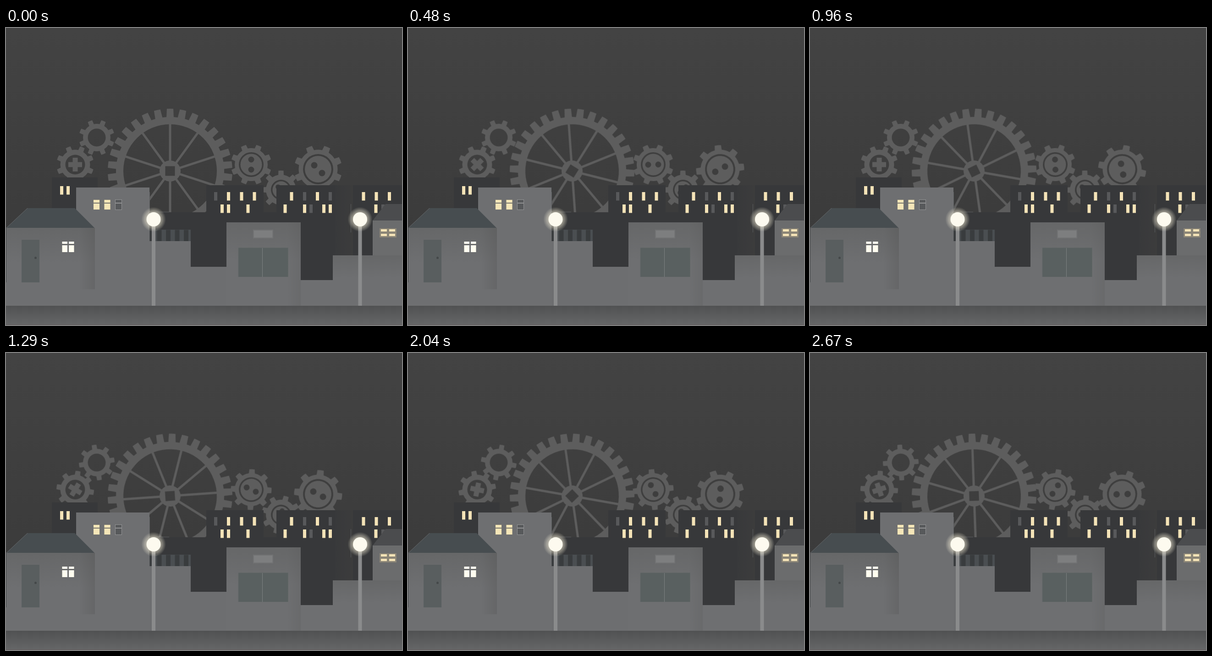
An HTML page that plays this animation: 864 px wide and 648 px high, repeating every 2700 ms.

```html
<!DOCTYPE html>
<html lang="en">
<head>
<meta charset="utf-8">
<title>Clockwork town at night</title>
<style>
  html, body { margin: 0; width: 100%; height: 100%; overflow: hidden; background: #404040; }
  svg { display: block; width: 100vw; height: 100vh; }
  .spin { animation: spin 2.7s steps(90, end) infinite; }
  @keyframes spin {
    from { transform: rotate(0deg); }
    to { transform: rotate(var(--turn)); }
  }
</style>
</head>
<body>
<svg viewBox="0 0 864 648" preserveAspectRatio="none">
  <defs>
    <linearGradient id="sky" x2="0" y2="1">
      <stop offset="0" stop-color="#434343"/>
      <stop offset=".35" stop-color="#3f3f3f"/>
      <stop offset=".7" stop-color="#3b3b3b"/>
    </linearGradient>
    <linearGradient id="road" x2="0" y2="1">
      <stop offset="0" stop-color="#505152"/>
      <stop offset="1" stop-color="#656667"/>
    </linearGradient>
    <linearGradient id="wall" x2="0" y2="1">
      <stop offset="0" stop-color="#666768"/>
      <stop offset=".45" stop-color="#6e6f71"/>
    </linearGradient>
    <linearGradient id="shade">
      <stop offset="0" stop-color="#555" stop-opacity="0"/>
      <stop offset="1" stop-color="#555" stop-opacity=".35"/>
    </linearGradient>
    <linearGradient id="haze">
      <stop offset="0" stop-color="#38393b"/>
      <stop offset="1" stop-color="#3c3c3c"/>
    </linearGradient>
    <radialGradient id="glow">
      <stop offset=".5" stop-color="#fff8e0" stop-opacity=".6"/>
      <stop offset="1" stop-color="#fff8e0" stop-opacity="0"/>
    </radialGradient>
  </defs>

  <rect width="864" height="648" fill="url(#sky)"/>
  <g id="gears" fill="#5d5d5d" fill-rule="evenodd" stroke="none"></g>

  <!-- far blocks -->
  <g fill="#37383a">
    <path d="M100 326H200V400H100Z"/>
    <path d="M313 402H437V343H562V402H590V343H717V606H313Z"/>
    <path d="M757 343H864V500H757Z"/>
    <path d="M717 343H757V500H717Z" fill="url(#haze)"/>
  </g>
  <path d="M313.500 358V401.500H356M752.500 384V446" fill="none" stroke="#595b5d"/>
  <g id="lights"></g>

  <!-- near walls -->
  <path d="M153 348H313V606H153Z" fill="#6e6f71"/>
  <path d="M313 440H403V466H313Z" fill="#4a4e51"/>
  <path d="M314 453H403" stroke="#393c3e" stroke-width="25" stroke-dasharray="10 9.500" stroke-dashoffset="4"/>
  <path d="M313 465H403V521H481V606H313Z" fill="#6d6e70"/>
  <path d="M481 424H643V606H481Z" fill="url(#wall)"/>
  <path d="M613 424H643V606H613Z" fill="url(#shade)" opacity=".6"/>
  <path d="M643 550H713V496H864V606H643Z" fill="url(#wall)"/>
  <path d="M540 441H582V458H540Z" fill="#7d7e7f" stroke="#727374" stroke-width="2"/>
  <path d="M507 479H615V543H507Z" fill="#596060"/>
  <path d="M559.500 479V543" stroke="#7c8181"/>
  <path d="M507 543V479.500H615.500V543" fill="none" stroke="#626767"/>

  <g id="panes" fill="#f8e9ba"></g>

  <!-- left house -->
  <path d="M0 436H194V606H0Z" fill="url(#wall)"/>
  <path d="M160 436H194V570H160Z" fill="url(#shade)"/>
  <path d="M.5 436V555" stroke="#444648"/>
  <path d="M1 436L47 393H150L193 436Z" fill="#474d50"/>
  <path d="M1 436L47 393" stroke="#66696b"/>
  <path d="M34 462H73V555H34Z" fill="#595e5f"/>
  <circle cx="64.500" cy="501.500" r="2.500" fill="#444849"/>
  <path d="M122.500 466H134V471H122.500ZM137 466H148.500V471H137ZM122.500 474H134V489H122.500ZM137 474H148.500V489H137Z" fill="#fffdf0"/>

  <!-- right house -->
  <path d="M800 420H864V496H800Z" fill="#6b6c6d"/>
  <path d="M800 420L828 384H864V420Z" fill="#4b4c4e"/>
  <path d="M815 437H852V457H815Z" fill="#8b8577"/>
  <path d="M818 439H831V444H818ZM836 439H849V444H836ZM818 449H831V454H818ZM836 449H849V454H836Z" fill="#f4e3b7"/>

  <path d="M0 606H864V648H0Z" fill="url(#road)"/>
  <path d="M0 606.500H864" stroke="#515253"/>
  <path d="M0 647.500H864" stroke="#625b5c"/>
  <g id="lamps"></g>
</svg>

<script>
const $ = id => document.getElementById(id);
const rect = (x, y, w, h, fill) => `<rect x="${x}" y="${y}" width="${w}" height="${h}" fill="${fill}"/>`;

const polar = (r, a) => `${(r * Math.sin(a)).toFixed(2)} ${(-r * Math.cos(a)).toFixed(2)}`;
const disc = (r, x = 0, y = 0) => `M${x - r} ${y}a${r} ${r} 0 1 1 ${2 * r} 0a${r} ${r} 0 1 1 ${-2 * r} 0Z`;
const plus = (a, b) => `M${-b} ${-a}H${b}V${-b}H${a}V${b}H${b}V${a}H${-b}V${b}H${-a}V${-b}H${-b}Z`;

// Toothed outline: tip and foot are half widths as a share of the pitch
function cog(n, R, root, phase, tip, foot) {
  const pitch = 2 * Math.PI / n;
  let d = '';
  for (let i = 0; i < n; i++) {
    const a = (i + phase) * pitch;
    d += (i ? 'L' : 'M') + polar(root, a - foot * pitch)
      + 'L' + polar(R, a - tip * pitch)
      + `A${R} ${R} 0 0 1 ` + polar(R, a + tip * pitch)
      + 'L' + polar(root, a + foot * pitch)
      + `A${root} ${root} 0 0 1 ` + polar(root, a + (1 - foot) * pitch);
  }
  return d + 'Z';
}

const spinner = (x, y, step, body) =>
  `<g transform="translate(${x} ${y})"><g class="spin" style="--turn:${step * 90}deg">${body}</g></g>`;
const path = d => `<path d="${d}"/>`;
const small = (R, root, phase = .5) => cog(8, R, root, phase, .17, .23);

// Ring with two eyes along the axis at angle a
function eyes(outer, inner, r, dist, a) {
  const x = dist * Math.cos(a), y = dist * Math.sin(a);
  return disc(outer) + disc(inner) + disc(r, x, y) + disc(r, -x, -y);
}

let spokes = '';
for (let i = 0; i < 10; i++) {
  const a = i * Math.PI / 5;
  spokes += `M${polar(21, a)}L${polar(104, a)}`;
}
const wheel = path(cog(30, 136, 118, 0, .25, .32) + disc(102))
  + `<path d="${spokes}" stroke="#5d5d5d" stroke-width="5"/>`
  + path(disc(23) + 'M-10.500 -10.500H10.500V10.500H-10.500Z');

$('gears').innerHTML =
  spinner(358, 312, 2, wheel)
  + spinner(198, 239, -2.82, path(small(39, 30) + disc(19.5)))
  + spinner(151, 298, 2.82, path(small(41, 32.5) + disc(21.5) + plus(15, 5.5)))
  + spinner(535, 298, -5.7, path(small(44.5, 36) + eyes(27, 23.5, 6.5, 11, Math.PI / 2)))
  + spinner(600, 353, 5.6, path(small(42, 33, 0) + eyes(22, 18.5, 5.5, 9, Math.PI / 4)))
  + spinner(681, 308, -4.57, path(small(52.5, 42.5) + eyes(33, 29, 7, 12, Math.PI / 4)));

const lit = '#f4e3b7', dim = '#58595b';
const row = (y, xs, fill) => xs.map(x => rect(x, y, 7, 18.5, fill)).join('');
$('lights').innerHTML =
  row(345, [118, 132], lit)
  + row(358, [482, 510.5, 538.5, 619.5, 676, 776.5, 804.5, 833], lit)
  + row(358, [454, 648, 704], dim)
  + row(385, [468, 482, 524.5, 605.5, 648, 690, 704, 803.5], lit)
  + row(385, [662, 819], dim);

const sash = (x, fill, frame) =>
  rect(x - 1, 374, 15, 23, frame) + rect(x, 375, 13, 6, fill) + rect(x, 383, 13, 13, fill);
$('panes').innerHTML =
  sash(191, '#f5e6b8', '#77766f') + sash(214.5, '#f5e6b8', '#77766f') + sash(239, '#57595b', '#929394');

$('lamps').innerHTML = [322, 772.5].map(x =>
  rect(x - 4, 430, 8, 176, '#8a8b8c')
  + `<circle cx="${x}" cy="417.500" r="27" fill="url(#glow)"/>`
  + `<circle cx="${x}" cy="417.500" r="15.500" fill="#fdfaef"/>`).join('');
</script>
</body>
</html>
```
